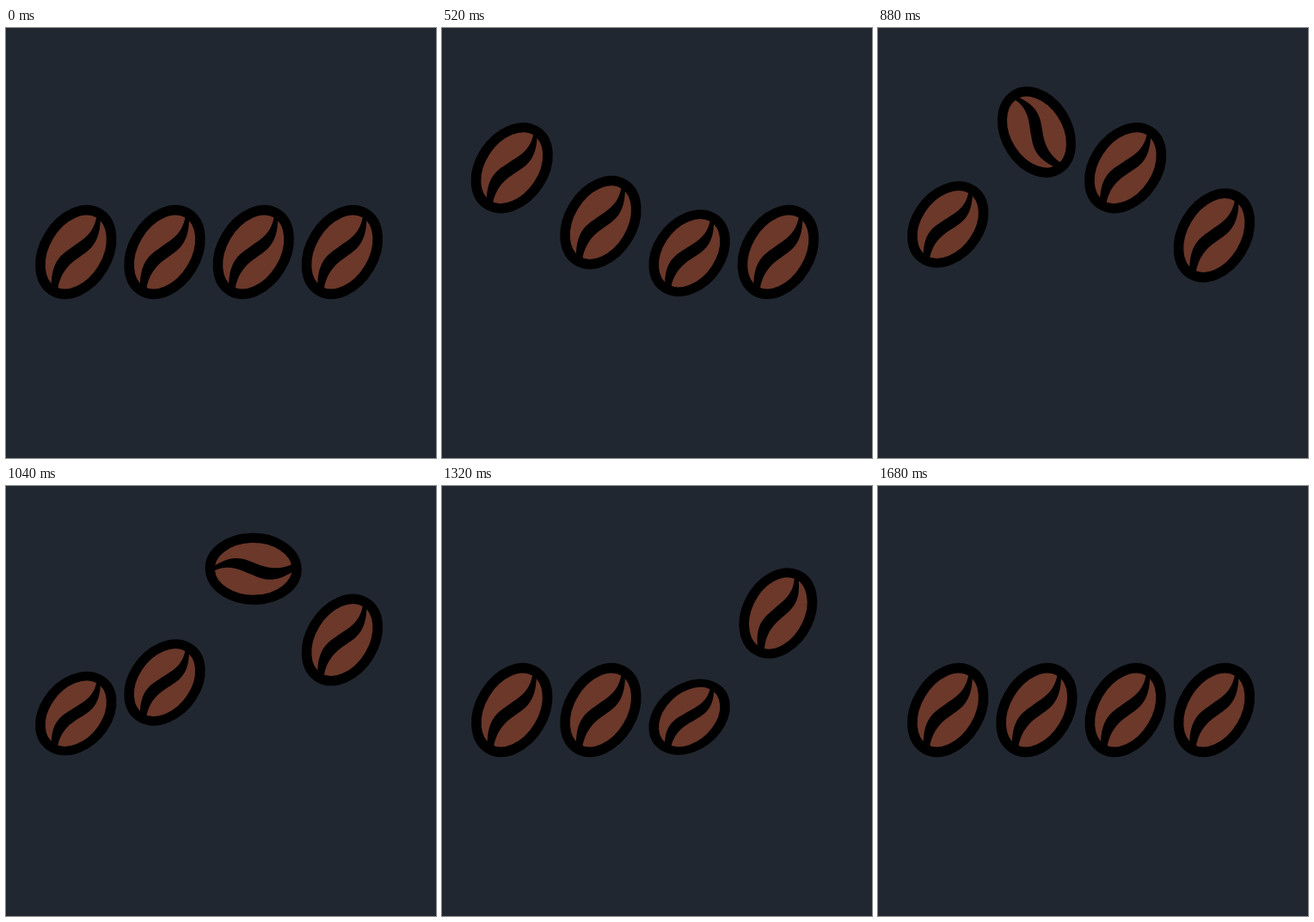
These frames come from a looping animation (500x500 px, 2520 ms). An HTML page:

```html
<!DOCTYPE html>
<html lang="en">
<head>
<meta charset="utf-8">
<title>Jumping coffee beans</title>
<style>
  html, body { margin: 0; height: 100%; overflow: hidden; background: #212730; }
  svg { display: block; width: 100%; height: 100%; }
</style>
</head>
<body>
<svg viewBox="0 0 500 500">
  <defs>
    <g id="bean">
      <ellipse rx="52.4" ry="36.6" transform="rotate(-59)" fill="#6b382a" stroke="#000" stroke-width="11.6"/>
      <path d="M24-41C20.5-19 5-13-6-4.5C-17 3-28 11-28.5 38L-21 42C-17 21-5 12 6 4.5C17-3 28-11 28.5-38Z"/>
    </g>
  </defs>
  <use href="#bean"/>
  <use href="#bean"/>
  <use href="#bean"/>
  <use href="#bean"/>
</svg>
<script>
const LOOP = 2520, STEP = 40;
const beans = document.querySelectorAll('svg > use');

// Progress from 0 to 1 between two times.
const ramp = (t, from, to) => Math.min(1, Math.max(0, (t - from) / (to - from)));

// Crouch, rise, fall past the ground, recover.
const lift = t => 2 * ramp(t, 0, 258) - 167 * ramp(t, 258, 682) ** 1.07
  + 174 * ramp(t, 682, 941) - 9 * ramp(t, 941, 1120);

// Crouch, stretch, shrink in the air, impact, recover.
const squash = t => 1 - .12 * ramp(t, 0, 250) + .12 * ramp(t, 250, 320)
  - .09 * ramp(t, 320, 930) - .12 * ramp(t, 930, 965) + .21 * ramp(t, 965, 1120);

const spin = t => 360 * ramp(t, 519, 765);

function draw() {
  // The motion advances in 40 ms steps; the small offset absorbs timer rounding.
  const now = Math.floor((performance.now() + 2) % LOOP / STEP) * STEP;
  beans.forEach((bean, i) => {
    const t = now - (i && 200 * i - STEP);
    const x = 81.25 + 103.2 * i, y = 260.5 + lift(t);
    bean.setAttribute('transform',
      `translate(${x} ${y}) rotate(${spin(t)}) scale(1 ${squash(t)})`);
  });
  requestAnimationFrame(draw);
}
draw();
</script>
</body>
</html>
```
